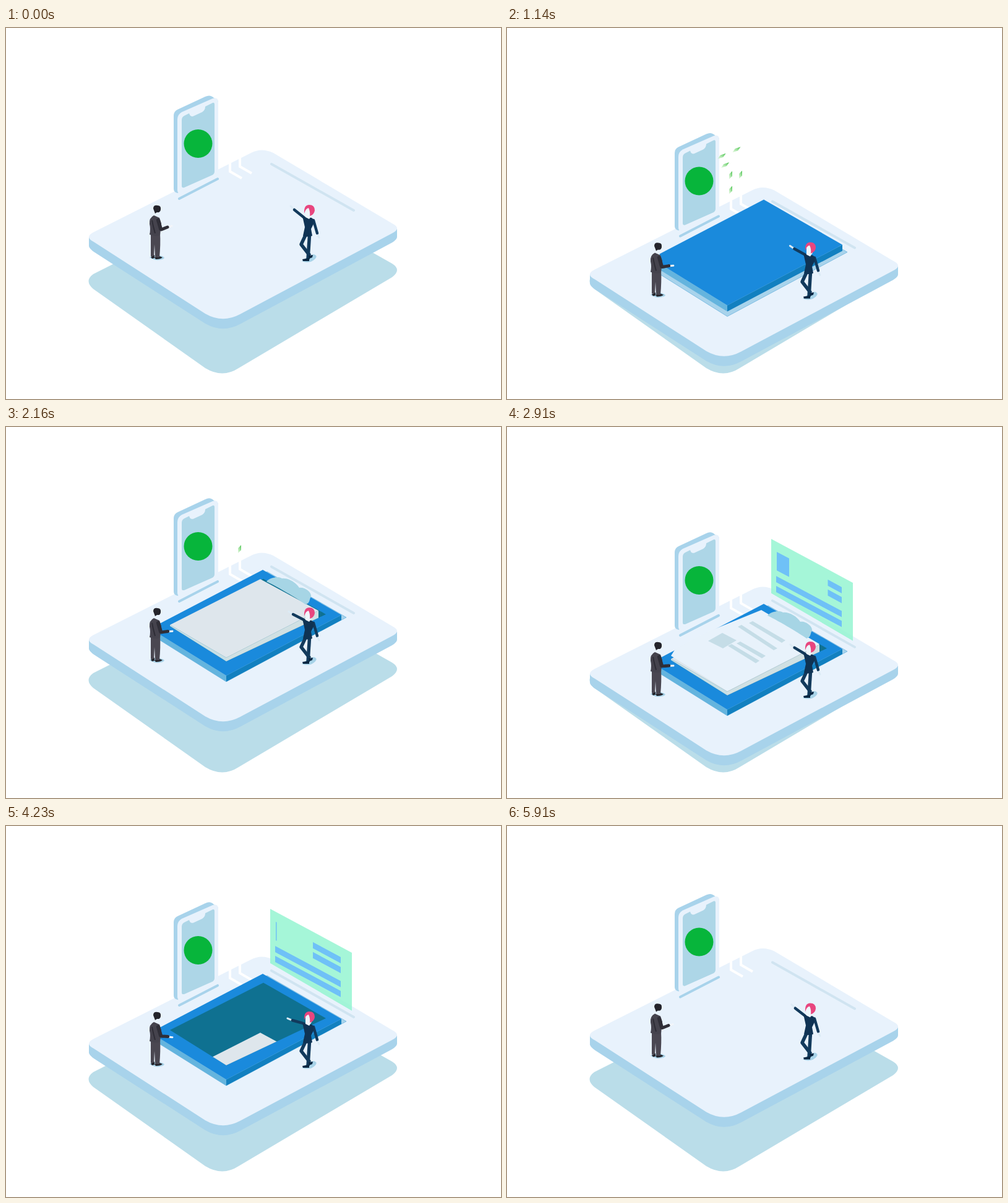
These frames come from a looping animation (800x600 px, 5.94 s). An HTML page:

```html
<!DOCTYPE html>
<html lang="en">
<head>
<meta charset="utf-8">
<title>Isometric clipboard</title>
<style>
html, body { margin: 0; width: 100%; height: 100%; overflow: hidden; background: #fff; }
svg { display: block; width: 800px; height: 600px; }
</style>
</head>
<body>
<svg viewBox="0 0 800 600">
  <defs>
    <linearGradient id="leaf" x1="0" y1="1" x2="1" y2="0">
      <stop offset="0" stop-color="#b9efb0" stop-opacity=".4"/>
      <stop offset="1" stop-color="#3fbf45"/>
    </linearGradient>
    <clipPath id="holeClip"><polygon points="233,329 356,406 550,302 550,0 233,0"/></clipPath>
    <clipPath id="wellClip"><polygon points="265,316 356,373 517,297 517,0 265,0"/></clipPath>
    <clipPath id="panelClip"><polygon points="427,0 559,0 559,285 427,208"/></clipPath>
  </defs>

  <path fill="#badde9" d="M141,398 L395,270 Q413,262 432,272 L624,381 Q640,391 624,403 L376,550 Q350,567 322,550 L141,422 Q126,409 141,398Z"/>

  <g id="stage">
    <path fill="#a8d3eb" d="M134,338 V353 Q135,357 142,362 L322,478 Q350,494 378,479 L624,347 Q632,342 632,338 V325Z"/>
    <path fill="#e8f2fc" d="M142,330 L396,202 Q413,193 432,202 L624,316 Q640,324 624,332 L378,463 Q350,478 322,462 L142,346 Q126,338 142,330Z"/>
    <path d="M429,220 L562,295" stroke="#d0e4f1" stroke-width="4" stroke-linecap="round"/>
    <path d="M362,214 V232 L381,243 M378,206 V224 L397,235" fill="none" stroke="#fff" stroke-width="4"/>
    <polygon id="hole" fill="#a8d3eb" stroke="#6fb5df" stroke-width=".8"/>

    <g clip-path="url(#holeClip)">
      <g id="board">
        <polygon fill="#64b4de" points="233,320 356,396 356,406 233,330"/>
        <polygon fill="#1280c0" points="356,396 542,298 542,308 356,406"/>
        <polygon fill="#1a8adc" points="415,225 542,298 356,396 233,320"/>
      </g>
    </g>
    <polygon id="well" fill="#0f7191"/>
    <g clip-path="url(#wellClip)">
      <g id="paper">
        <polygon fill="#c6dfe6" points="265,314 356,367 356,440 265,387"/>
        <polygon fill="#d0e0e3" points="356,367 505,291 505,364 356,440"/>
        <polygon fill="#dee6ec" points="411,240 505,291 356,367 265,314"/>
      </g>
    </g>
    <g id="sheet">
      <polygon fill="#e8f2fb" points="411,235 505,290 356,366 265,309 272,298 325,270"/>
      <g fill="#c5dde7">
        <polygon points="325,285 348,272 371,284 349,297"/>
        <polygon points="371,289 377,286 418,309 412,313"/>
        <polygon points="357,293 363,290 408,317 402,321"/>
        <polygon points="391,256 397,253 450,284 444,288"/>
        <polygon points="373,262 379,259 437,297 431,300"/>
      </g>
    </g>
    <path id="clip" fill="#a6d5e5" d="M421,244 C426,238 440,235 446,239 C456,238 468,245 474,254 C484,253 494,262 493,268 C490,272 492,279 484,281 C478,276 440,253 421,244Z"/>

    <path d="M280,276 L342,244" stroke="#a8d3eb" stroke-width="4" stroke-linecap="round"/>
    <path fill="#a8d3eb" d="M271,142 Q271,135 277,132 L322,111 Q330,107 336,113 L343,118 L278,267 Q271,266 271,260Z"/>
    <path fill="#e8f2fc" d="M277,148 Q277,140 284,136 L334,114 Q343,111 343,120 V233 Q343,240 337,243 L284,267 Q277,269 277,262Z"/>
    <path fill="#add6e7" d="M284,149 Q284,144 288,142 L296,138 Q298,145 304,142 L317,136 Q322,133 322,127 L334,121 Q337,120 337,124 V232 Q337,236 333,238 L288,258 Q284,259 284,255Z"/>
    <circle cx="310.5" cy="187" r="23" fill="#07b53b"/>
    <g id="leaves" fill="url(#leaf)"></g>

    <g clip-path="url(#panelClip)">
      <g id="panel">
        <polygon fill="#94f5d1" fill-opacity=".84" points="427,120 559,191 559,285 427,208"/>
        <g id="bars" fill="#6fc1f7"></g>
      </g>
    </g>

    <g id="man">
      <path fill="#a8d3e8" d="M232,371 Q240,366 249,368 Q260,371 253,374 Q242,378 232,371Z"/>
      <path fill="#e8f2fc" d="M240,293 H250 V299 Q249,302 246,302 L247,308 L239,306Z"/>
      <path fill="#24242b" d="M238,292 Q238,286 245,287 Q251,287 250,294 Q249,299 244,298 L241,300Z"/>
      <path fill="#24242b" d="M234,370 L240,367 V372 L236,373Z M240,371 L248,369 L253,371 Q250,374 242,374Z"/>
      <path fill="#4a4751" d="M234,332 L249,332 Q250,350 248,371 H241 L240,350 L239,369 H234Z"/>
      <path fill="#45434d" d="M239,303 L248,307 L251,316 L249,335 Q241,338 232,334 Q234,325 232,317 Q231,307 239,303Z"/>
      <path d="M236,311 Q238,322 241,332" fill="none" stroke="#2e2d36" stroke-width="2"/>
      <path d="M246,311 L250,325" fill="none" stroke="#2f2e37" stroke-width="6" stroke-linecap="round"/>
      <g id="manArm">
        <path d="M262,322 L268,320" stroke="#f3f6fa" stroke-width="3" stroke-linecap="round"/>
        <path d="M251,326 L261,322" stroke="#2f2e37" stroke-width="5" stroke-linecap="round"/>
      </g>
    </g>

    <g id="woman">
      <path fill="#a8d3e8" d="M478,377 Q486,370 497,366 Q505,368 499,374 Q490,382 478,377Z"/>
      <g id="womanArm">
        <path d="M460,288 L466,294" stroke="#dcebf5" stroke-width="3" stroke-linecap="round"/>
        <path d="M466,294 L481,306" stroke="#123a5c" stroke-width="4.5" stroke-linecap="round"/>
      </g>
      <path d="M497,311 L503,332" stroke="#123a5c" stroke-width="4.5" stroke-linecap="round"/>
      <path d="M504,335 L506,339" stroke="#dcebf5" stroke-width="3" stroke-linecap="round"/>
      <g fill="none" stroke="#123a5c" stroke-width="5.5" stroke-linejoin="round">
        <path d="M484,335 L477,350 L491,368"/>
        <path d="M490.5,335 L488,374"/>
      </g>
      <path fill="#0a2742" d="M479,374 L490,372 V377 L480,377Z M489,368 L496,367 L495,371 L490,373Z"/>
      <path fill="#0f3354" d="M479,304 L486,306 L494,307 Q499,310 497,317 L493,325 L495,336 Q487,339 480,336 L483,322Z"/>
      <path fill="#eef5fb" d="M484,290 H494 V303 L490,309 L484,306Z"/>
      <path fill="#e8467f" d="M482,300 Q481,286 490,286 Q499,286 499,295 Q498,302 491,304 Q492,297 489,291 Q484,292 482,300Z"/>
    </g>
  </g>
</svg>
<script>
const LOOP = 5940, STEP = 30;
const $ = id => document.getElementById(id);
const set = (id, name, value) => $(id).setAttribute(name, value);
const shift = (id, y) => set(id, 'transform', `translate(0 ${y})`);
const mix = (a, b, u) => a + (b - a) * u;

// Smooth 0..1 progress between two times.
function ramp(t, from, to) {
  const u = Math.min(1, Math.max(0, (t - from) / (to - from)));
  return u * u * (3 - 2 * u);
}
const inOut = (t, a, b, c, d) => ramp(t, a, b) - ramp(t, c, d);

function keyed(t, keys) {
  const i = keys.findIndex(k => k[0] > t);
  const [t0, a] = keys[i - 1], [t1, b] = keys[i];
  return mix(a, b, (t - t0) / (t1 - t0));
}

// The slab sinks more slowly than it comes back up.
function bob(t) {
  const p = t % 1950;
  return p < 1050 ? 31 * (1 - Math.cos(Math.PI * p / 1050))
                  : 31 * (1 + Math.cos(Math.PI * (p - 1050) / 900));
}

// A diamond that opens from its top right edge.
function openDiamond(id, [top, right, bottom, left], u) {
  const along = (a, b) => [mix(a[0], b[0], u), mix(a[1], b[1], u)];
  set(id, 'points', [top, right, along(right, bottom), along(top, left)].join(' '));
  set(id, 'visibility', u > 0 ? 'visible' : 'hidden');
}
const HOLE = [[422, 228], [550, 302], [356, 406], [233, 329]];
const WELL = [[416, 239.5], [517, 297], [356, 373], [265, 316]];

function bar(x, y, width, height) {
  if (width <= 0) return '';
  const drop = width * .535;
  return `<path d="M${x},${y} l${width},${drop} v${height} l${-width},${-drop}z"/>`;
}

function drawBars(t) {
  const long = 106 * inOut(t, 2400, 2750, 4400, 4600);
  const short = 45 * inOut(t, 2730, 3090, 4320, 4500);
  const block = 20 * inOut(t, 2500, 2850, 3930, 4290);
  $('bars').innerHTML = bar(436, 141, block, 30)
    + bar(435, 180, long, 10) + bar(435, 196, long, 10)
    + bar(541 - short, 198 - short * .535, short, 10)
    + bar(541 - short, 214 - short * .535, short, 10);
}

const STREAMS = [
  { path: [[343, 166], [358, 159], [362, 165], [362, 226]], starts: [650, 850, 1057, 1250] },
  { path: [[343, 149], [372, 136], [378, 143], [378, 210]], starts: [530, 890, 1107, 1427] }
];

function leafAt(path, distance) {
  for (let i = 1; i < path.length; i++) {
    const [a, b] = [path[i - 1], path[i]];
    const length = Math.hypot(b[0] - a[0], b[1] - a[1]);
    if (distance <= length) {
      const x = mix(a[0], b[0], distance / length), y = mix(a[1], b[1], distance / length);
      return i === 1
        ? `<path d="M${x - 6},${y + 4} l4,-6 l9,-3 l-4,6z"/>`
        : `<path d="M${x - 3},${y} l5,-5 v8 l-5,5z"/>`;
    }
    distance -= length;
  }
  return '';
}

function drawLeaves(t) {
  $('leaves').innerHTML = STREAMS.map(({ path, starts }) =>
    starts.map(s => t < s ? '' : leafAt(path, (t - s) * .12)).join('')).join('');
}

function render(t) {
  shift('stage', bob(t));

  openDiamond('hole', HOLE, inOut(t, 100, 500, 5100, 5460));
  shift('board', mix(190, -8, ramp(t, 500, 1110)) + 8 * ramp(t, 1140, 1350) + 190 * ramp(t, 4550, 5050));
  openDiamond('well', WELL, inOut(t, 1300, 1550, 4430, 4550));

  const paperIn = inOut(t, 1550, 2050, 4010, 4430);
  shift('paper', 150 * (1 - paperIn));
  set('paper', 'visibility', paperIn > 0 ? 'visible' : 'hidden');
  set('sheet', 'opacity', inOut(t, 2400, 2800, 3700, 4000));
  set('clip', 'opacity', inOut(t, 1920, 2100, 3800, 4000));

  shift('panel', 170 * (1 - inOut(t, 2200, 2550, 4500, 4850)));
  drawBars(t);
  drawLeaves(t);

  const manTurn = keyed(t, [[0, 0], [1140, 12], [2160, 14], [2910, 17], [4230, 25], [5160, 7], [LOOP, 0]]);
  const womanTurn = keyed(t, [[0, 0], [1140, -10], [2160, -12], [2910, -8], [4230, -23], [5160, -16], [LOOP, 0]]);
  set('manArm', 'transform', `rotate(${manTurn} 251 326)`);
  set('womanArm', 'transform', `rotate(${womanTurn} 480 305)`);
}

const start = performance.now();
function tick() {
  const t = (performance.now() - start) % LOOP;
  render(Math.floor(t / STEP) * STEP);
  requestAnimationFrame(tick);
}
tick();
</script>
</body>
</html>
```
